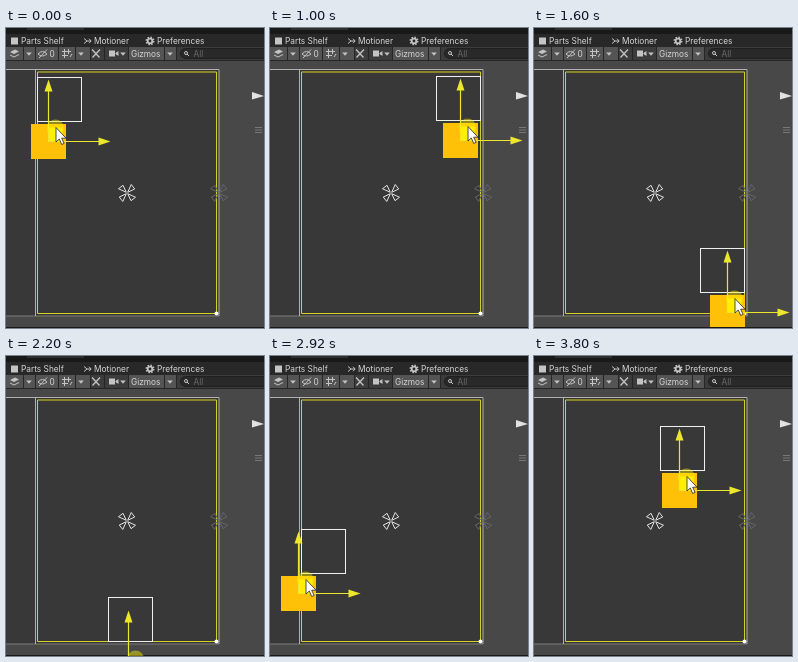
An HTML page for the animation above (3880 ms loop, 258 px wide and 300 px high).

```html
<!DOCTYPE html>
<html lang="en">
<head>
<meta charset="utf-8">
<style>
  html, body { margin: 0; width: 100%; height: 100%; overflow: hidden; background: #484848; }
  svg { display: block; width: 258px; height: 300px; }
  text { font: 8.3px Inter, sans-serif; fill: #d6d6d6; }
  .line { fill: none; stroke: #c4c4c4; }
  .icon { fill: #c4c4c4; }
</style>
</head>
<body>
<svg viewBox="0 0 258 300">
  <defs>
    <path id="caret" class="icon" d="M-2.8-1.5h5.6L0 1.7z"/>
    <path id="blade" d="M1 0L9-3L8.3 2.6z"/>
    <g id="pinwheel" fill="none" stroke-width=".9">
      <use href="#blade" transform="rotate(45)"/>
      <use href="#blade" transform="rotate(135)"/>
      <use href="#blade" transform="rotate(225)"/>
      <use href="#blade" transform="rotate(315)"/>
    </g>
    <path id="arrow" d="M0-.6H50V-4L62 0L50 4V.6H0z"/>
  </defs>

  <!-- scene -->
  <path fill="#383838" d="M0 41h213v247H0z"/>
  <path fill="none" stroke="#7c7c7c" d="M0 288H213"/>
  <path fill="none" stroke="#b0b0b0" d="M0 41.5H213V288M29.5 41.5V288"/>
  <path fill="none" stroke="#d8d020" d="M31.5 44h179v241.500h-179z"/>
  <circle cx="210.5" cy="285.5" r="2" fill="#fff"/>
  <use href="#pinwheel" x="121" y="165" stroke="#ececec"/>
  <use href="#pinwheel" x="213" y="165" stroke="#666"/>
  <path fill="#e2e2e2" d="M246 64L258 68L246 71.500z"/>
  <path stroke="#777" d="M249 99.5h7M249 102h7M249 104.5h7"/>

  <!-- moving parts -->
  <path id="body" fill="#ffc107" d="M-17.5-17.5h35v35h-35z"/>
  <rect id="frame" width="44" height="44" fill="none" stroke="#f0f0f0"/>
  <path fill="#191919" d="M0 299h258v1H0z"/>
  <g id="gizmo">
    <path fill="#ff0" opacity=".75" d="M0-14h14v14H0z"/>
    <g fill="#ece62c">
      <use href="#arrow"/>
      <use href="#arrow" transform="rotate(-90)"/>
    </g>
    <g transform="translate(7 -13.5)">
      <circle r="8.5" fill="#fff000" opacity=".45"/>
      <path fill="#fff" stroke="#222" stroke-width=".8" d="M.5-.5V14L3.8 11L6.2 16.5L8.6 15.4L6.2 10.2H10.5z"/>
    </g>
  </g>

  <!-- tabs -->
  <path fill="#191919" d="M0 0h258v6H0z"/>
  <path fill="#303030" d="M21 0h57v2H21z"/>
  <path fill="#282828" d="M0 6h258v13H0z"/>
  <path class="icon" d="M5 9.500h7v7H5z"/>
  <text x="15" y="16">Parts Shelf</text>
  <path class="line" d="M78 10.500l3 2.500h4M78 15.500l3-2.500M83 10.800l2.200 2.200l-2.200 2.200"/>
  <text x="88" y="16">Motioner</text>
  <circle class="line" cx="144" cy="13" r="2.300" stroke-width="1.800"/>
  <circle class="line" cx="144" cy="13" r="3.800" stroke-width="1.400" stroke-dasharray="1.500 1.484"/>
  <text x="151" y="16">Preferences</text>

  <!-- toolbar -->
  <path fill="#3c3c3c" d="M0 19h258v13H0z"/>
  <path fill="#545454" d="M0 19h29v13H0zM30 19h22v13H30zM53 19h31v13H53zM123 19h47v13H123z"/>
  <path stroke="#262626" d="M0 32.500h258M17.500 19v13M29.500 19v13M52.500 19v13M69.500 19v13M84.500 19v13M98.500 19v13M122.500 19v13M158.500 19v13M170.500 19v13"/>
  <path class="icon" d="M4 24l5-2.500 4 2-5 2.500zM4 26.500l4 2 5-2.500v1l-5 2.500-4-2z"/>
  <path class="line" d="M32 26q4.500-5 9 0q-4.500 4-9 0M33 30l8-8.500"/>
  <text x="43.500" y="29">0</text>
  <path class="line" d="M56 23.500h9M56 27.500h6M58.500 21v9M62.500 21v5M64 29l2-3"/>
  <path class="line" stroke-width="1.300" d="M86 21.500l7.500 8M94 21.500l-7.500 8"/>
  <path class="icon" d="M103 22.500h6v6h-6zM109.500 25l3-2v5l-3-2z"/>
  <text x="125" y="28.700">Gizmos</text>
  <use href="#caret" x="23" y="26"/>
  <use href="#caret" x="75" y="26"/>
  <use href="#caret" x="117" y="26"/>
  <use href="#caret" x="164" y="26"/>
  <rect x="174.500" y="20.500" width="90" height="10" rx="5" fill="#292929" stroke="#1f1f1f"/>
  <circle class="line" cx="180" cy="25" r="1.500"/>
  <path class="line" d="M181 26l2 2"/>
  <text x="187.500" y="28.500" style="fill:#686868">All</text>
</svg>
<script>
  const LOOP = 3880;
  // [step, x, y] waypoints of the dragged square's centre
  const path = [
    [0, 42.5, 113], [3, 27, 106], [6, 62, 102], [8, 102.5, 108.5], [9, 120.5, 109],
    [12, 168, 109], [15, 190.5, 112], [18, 195, 163.5], [21, 195, 228], [24, 193.5, 284.5],
    [27, 184, 306], [33, 122, 316], [36, 57.5, 308], [40, 17, 292], [44, 28, 237],
    [45, 29, 216], [47, 19, 185], [50, 50, 146], [53, 131.5, 152.5], [57, 145.5, 134.5]
  ];
  const [body, frame, gizmo] = ['body', 'frame', 'gizmo'].map(id => document.getElementById(id));
  const clamp = (v, lo, hi) => Math.min(hi, Math.max(lo, v));
  const snap = v => Math.floor(v) + 0.5;

  // Three steps per 200 ms, lasting 80, 40 and 80 ms
  function stepAt(ms) {
    const r = ms % 200;
    return 3 * Math.floor(ms / 200) + (r >= 80) + (r >= 120);
  }

  function slope(i, axis) {
    const a = path[Math.max(0, i - 1)], b = path[Math.min(path.length - 1, i + 1)];
    return (b[axis] - a[axis]) / (b[0] - a[0]);
  }

  // Cubic Hermite curve through the waypoints
  function position(step, axis) {
    const next = path.findIndex(p => p[0] > step);
    if (next < 0) return path[path.length - 1][axis];
    const i = next - 1, a = path[i], b = path[next];
    const h = b[0] - a[0], u = (step - a[0]) / h, v = 1 - u;
    return v * v * (1 + 2 * u) * a[axis] + u * u * (3 - 2 * u) * b[axis]
      + h * u * v * (v * slope(i, axis) - u * slope(next, axis));
  }

  function draw(now) {
    const step = stepAt(now % LOOP);
    const x = position(step, 1), y = position(step, 2);
    const move = `translate(${snap(x)} ${snap(y)})`;
    body.setAttribute('transform', move);
    gizmo.setAttribute('transform', move);
    frame.setAttribute('x', snap(clamp(x - 19.5, 31.5, 166.5)));
    frame.setAttribute('y', snap(clamp(y - 64, 44.5, 241.5)));
    requestAnimationFrame(() => draw(performance.now() - start));
  }

  const start = performance.now();
  draw(0);
</script>
</body>
</html>
```
